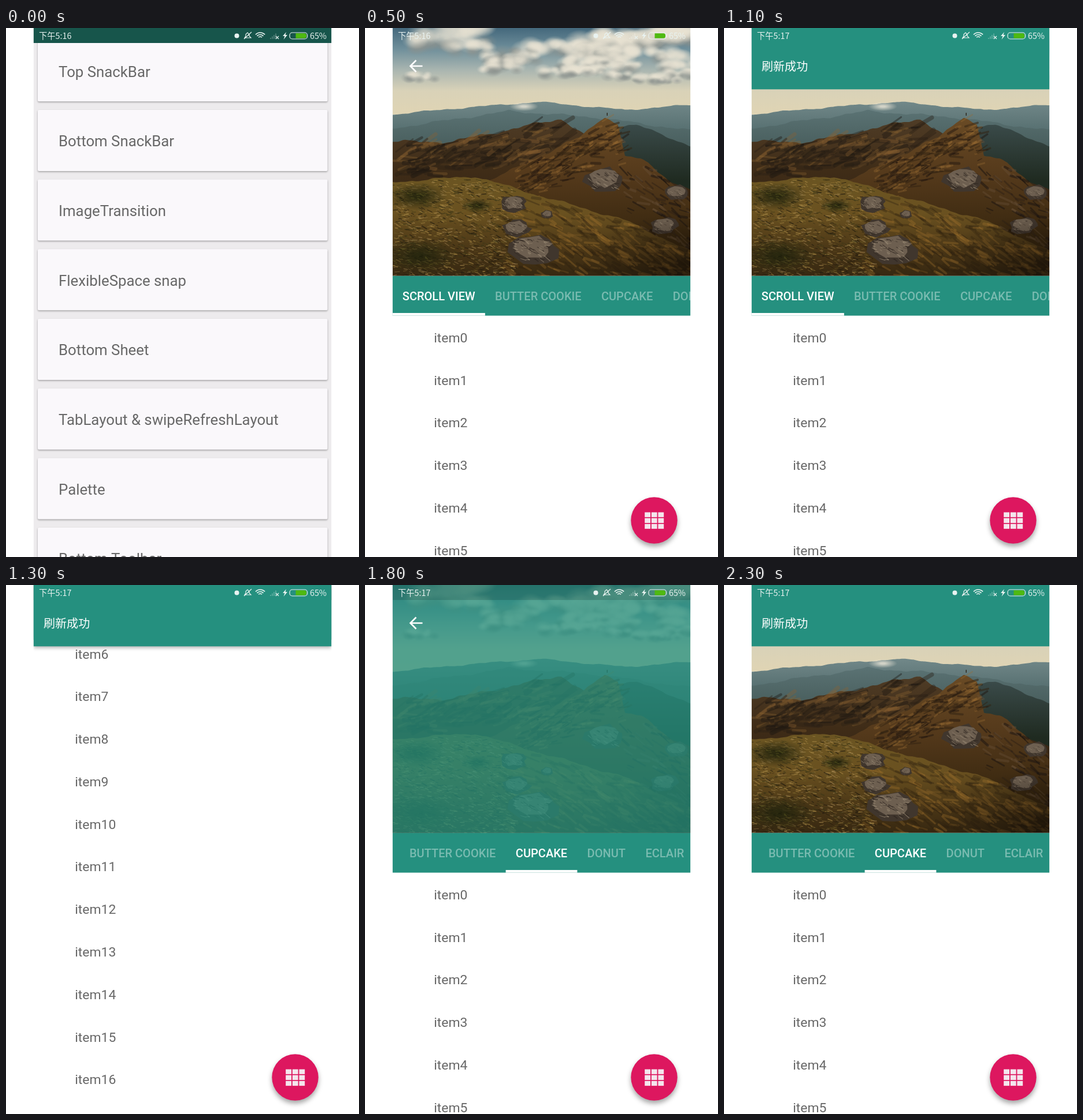
These frames come from a looping animation (611 by 917 pixels, 2400 ms). An HTML page with a canvas:

```html
<!DOCTYPE html>
<html lang="en">
<head>
<meta charset="utf-8">
<title>Refresh layout demo</title>
<style>
html, body { margin: 0; width: 100%; height: 100%; overflow: hidden; background: #fff; }
canvas { display: block; width: 611px; height: 917px; }
</style>
</head>
<body>
<canvas id="stage" width="611" height="917"></canvas>
<script>
const ctx = document.getElementById('stage').getContext('2d');
const LOOP = 2400, STEP = 100;
const H = 917, S = H / 1920, W = 1080 * S, L = (611 - W) / 2, R = L + W;
const SMALL = 42 * S, MEDIUM = 48 * S, LARGE = 54 * S;
const PHOTO_H = 900 * S, TAB_H = 144 * S, STATUS_H = 26, COLLAPSE = PHOTO_H - STATUS_H;
const ITEM_H = 73.77, LINE_H = 23.62, CARD_H = 120.7, SNACK_H = 106.3;
const TEAL = '#25907f', GREY = '#686868', ICON = '#e8f2f0';
const ROBOTO = 'Roboto, sans-serif';
const CJK = '"Noto Sans CJK SC", "Noto Sans CJK", sans-serif';

const CARDS = ['Top SnackBar', 'Bottom SnackBar', 'ImageTransition', 'FlexibleSpace snap',
  'Bottom Sheet', 'TabLayout & swipeRefreshLayout', 'Palette', 'Bottom Toolbar'];
const TABS = ['SCROLL VIEW', 'BUTTER COOKIE', 'CUPCAKE', 'DONUT', 'ECLAIR'];
const LOREM = `Lorem ipsum dolor sit amet, ut duis lorem provident
sed felis blandit, condimentum donec lectus ipsum
et mauris, morbi porttitor interdum feugiat nulla
donec sodales, vestibulum nisl primis a molestie
vestibulum quam, sapien mauris metus risus
suspendisse magnis. Augue viverra nulla faucibus
egestas eu, a etiam id congue rutrum ante, arcu
tincidunt donec quam felis at ornare, iaculis ligula
sodales venenatis commodo volutpat neque,
suspendisse elit praesent tellus felis mi amet.
Inceptos amet tempor lectus lorem est non, ac
donec ac libero neque mauris, tellus ante metus eget
leo consequat. Scelerisque dolor curabitur pretium
blandit ut feugiat, amet lacus pulvinar justo convallis
ut, sed natoque ipsum urna posuere nibh eu. Sed at
sed vulputate sit orci, facilisis a aliquam tellus quam
aliquam, eu aliquam donec at molestie ante,
pellentesque mauris lorem ultrices libero faucibus
porta, imperdiet adipiscing sit hac diam ut nulla.
Lacus enim elit pulvinar donec vehicula dapibus,
accumsan purus officia cursus dolor sapien, eu
amet dis mauris mi nulla ut. Non accusamus etiam
pede non urna tempus, vestibulum aliquam tortor
eget pharetra sodales, in vestibulum ut justo orci
nulla, lobortis purus sem semper consectetuer
magni purus. Dolor a leo vestibulum amet ut sit, arcu
ut eaque urna fusce aliquet turpis, sed fermentum
sed vestibulum nisl pede, tristique enim lorem
posuere in laborum ut. Vestibulum id id justo leo
nulla, magna lobortis ullamcorper et dignissim
pellentesque, duis suspendisse quis id lorem
Vivamus a nullam ante adipiscing amet, mi vitae
consectetuer nunc aenean pede quisque, eget
rhoncus dis porttitor habitant nunc vivamus, duis`.split('\n');

const ramp = (t, a, b) => Math.min(1, Math.max(0, (t - a) / (b - a)));
const mix = (a, b, k) => a + (b - a) * k;

function text(str, x, y, size, color, family = ROBOTO, weight = 400) {
  ctx.font = `${weight} ${size}px ${family}`;
  ctx.fillStyle = color;
  ctx.fillText(str, x, y);
}

function rect(x, y, w, h, color) {
  ctx.fillStyle = color;
  ctx.fillRect(x, y, w, h);
}

function disc(x, y, r, color) {
  ctx.fillStyle = color;
  ctx.beginPath();
  ctx.arc(x, y, r, 0, 7);
  ctx.fill();
}

function stroke(path, color, width) {
  ctx.strokeStyle = color;
  ctx.lineWidth = width;
  ctx.stroke(new Path2D(path));
}

function withShadow(alpha, blur, dy, draw) {
  ctx.save();
  ctx.shadowColor = `rgba(0,0,0,${alpha})`;
  ctx.shadowBlur = blur;
  ctx.shadowOffsetY = dy;
  draw();
  ctx.restore();
}

// Mountain view built from a few skylines, seeded clouds and grass.
function paintLandscape() {
  const cv = document.createElement('canvas');
  cv.width = 611;
  cv.height = Math.ceil(PHOTO_H);
  const g = cv.getContext('2d');
  let seed = 11;
  const rnd = () => (seed = seed * 16807 % 2147483647) / 2147483647;
  const between = (a, b) => mix(a, b, rnd());
  const floor = () => PHOTO_H;

  function gradient(y0, y1, colors) {
    const f = g.createLinearGradient(0, y0, 0, y1);
    colors.forEach((c, i) => f.addColorStop(i / (colors.length - 1), c));
    return f;
  }

  function puff(x, y, rx, ry, rgb, alpha) {
    g.save();
    g.translate(x, y);
    g.scale(rx, ry);
    const f = g.createRadialGradient(0, 0, 0.15, 0, 0, 1);
    f.addColorStop(0, `rgba(${rgb},${alpha})`);
    f.addColorStop(1, `rgba(${rgb},0)`);
    g.fillStyle = f;
    g.fillRect(-1, -1, 2, 2);
    g.restore();
  }

  function cloud(x, y, size) {
    for (let i = 0; i < 14; i++) {
      const k = rnd(), r = size * between(0.25, 0.5);
      puff(x + between(-1.3, 1.3) * size, y + (k - 0.5) * size * 0.6, r * 1.5, r,
        k > 0.65 ? '140,146,142' : '232,226,210', 0.6);
    }
  }

  // Fills below a jagged skyline and returns its height function.
  function ridge(colors, jag, ...pts) {
    const p = between(0, 6);
    const top = x => {
      let i = 1;
      while (i < pts.length - 1 && x > pts[i][0]) i++;
      const [x0, y0] = pts[i - 1], [x1, y1] = pts[i];
      const wave = Math.sin(x / 17 + p) + Math.sin(x / 7 + p * 2) / 2 + Math.sin(x / 3 + p * 3) / 4;
      return mix(y0, y1, (x - x0) / (x1 - x0)) + jag * wave;
    };
    const left = pts[0][0];
    g.fillStyle = gradient(Math.min(...pts.map(q => q[1])), pts[pts.length - 1][1] + 60, colors);
    g.beginPath();
    g.moveTo(left, PHOTO_H);
    for (let x = left; x <= 566; x += 2) g.lineTo(x, top(x));
    g.lineTo(566, PHOTO_H);
    g.fill();
    return top;
  }

  function streaks(n, x0, x1, top, bottom, colors, size, slope) {
    g.lineCap = 'round';
    for (let i = 0; i < n; i++) {
      const x = between(x0, x1), y = between(top(x) + 3, bottom(x)), len = size * between(0.4, 1.4);
      g.strokeStyle = colors[i % colors.length];
      g.lineWidth = size * between(0.1, 0.3);
      g.beginPath();
      g.moveTo(x, y);
      g.lineTo(x + len, y + len * (slope + between(-0.5, 0.5)));
      g.stroke();
    }
  }

  function rock(x, y, r) {
    const edge = scale => {
      g.beginPath();
      for (let a = 0; a < 6.28; a += 0.5) {
        const d = r * scale * between(0.75, 1.1);
        g.lineTo(x + d * Math.cos(a) * 1.25, y + d * Math.sin(a) * 0.8 + (1 - scale) * -r * 0.4);
      }
      g.fill();
    };
    g.fillStyle = '#40362d';
    edge(1);
    g.fillStyle = '#6d5f50';
    edge(0.72);
    streaks(r * 1.6, x - r, x + r * 0.7, () => y - r * 0.6, () => y + r * 0.5,
      ['#2a221c99', '#a0907a88'], r / 5, 0.5);
  }

  g.fillStyle = gradient(0, 145, ['#44687c', '#6f8f9b', '#a9b5b0', '#d9d2b8', '#dfd4b4']);
  g.fillRect(0, 0, 611, 150);
  cloud(160, 12, 45);
  for (let i = 0; i < 34; i++) {
    const d = i / 34;
    cloud(mix(L, R, Math.pow(rnd(), mix(0.35, 0.8, d))), 8 + 84 * d, mix(38, 18, d));
  }

  ridge(['#718889', '#4f6869'], 1, [L, 150], [150, 140], [300, 128], [450, 142], [566, 133]);
  ridge(['#5a7273', '#405452'], 1.5, [L, 174], [250, 144], [400, 155], [566, 178]);
  puff(275, 136, 25, 8, '236,231,216', 0.8);
  ridge(['#3a4a49', '#1f2a20'], 1.5, [400, 172], [470, 168], [566, 205]);

  const far = ridge(['#4f3c26', '#3f2c17', '#2f2114'], 2, [L, 197], [150, 197], [340, 157], [450, 235], [566, 280]);
  streaks(160, L, 330, far, x => mix(260, 235, ramp(x, L, 330)), ['#1b161166', '#8a623055', '#2a201566'], 26, -0.35);

  const peak = ridge(['#6a4b25', '#54391b', '#38270f'], 2,
    [214, 266], [370, 190], [415, 152], [438, 170], [450, 222], [490, 232], [566, 300]);
  streaks(190, 255, 440, peak, x => peak(x) + 65, ['#20160e77', '#9a6d3255', '#33231388'], 16, -0.4);
  streaks(170, 440, 566, peak, floor, ['#1c151088', '#6b553b55', '#2c201577'], 15, 0.6);
  rock(413, 263, 28);
  rock(518, 343, 20);
  rock(539, 285, 17);

  const near = ridge(['#6b5522', '#6a5120', '#4a3616', '#2f220f'], 1.5,
    [L, 267], [190, 257], [300, 290], [450, 333], [566, 388]);
  streaks(420, 230, 566, near, floor, ['#2a1e1055', '#a9782e4d', '#7d5a2566', '#32250f55'], 18, 0.5);
  streaks(1500, L, 260, near, floor, ['#1d170d99', '#a58643aa', '#6b5a2688', '#3a361899', '#c0a06a66'], 6, 0.2);
  for (const [x, y, r] of [[90, 292, 48], [195, 308, 26], [95, 395, 62]]) {
    puff(x, y, r * 1.1, r * 0.5, '38,38,14', 0.9);
    streaks(r, x - r * 0.8, x + r * 0.6, () => y - r * 0.3, () => y + r * 0.3, ['#5d5a2288', '#1d1d0c99'], 5, 0.2);
  }
  rock(256, 305, 20);
  rock(315, 323, 9);
  rock(262, 348, 20);
  rock(292, 384, 36);
  puff(R, PHOTO_H, 200, 110, '18,12,6', 0.6);
  g.fillStyle = '#30291f';
  g.fillRect(418.5, 147, 1.5, 5);
  return cv;
}
const photo = paintLandscape();

function statusBar(clock, alpha) {
  ctx.save();
  ctx.globalAlpha *= alpha;
  text('下午' + clock, 57, 19, 14.3, ICON, CJK);
  text('65%', 526, 18.5, 14.3, ICON, CJK);
  disc(399.5, 13.5, 4, ICON);
  stroke('M413 17l2-3v-3l3-3 3 3v3l3 3zM412 19L425 7', ICON, 1.2);
  for (let r = 4; r < 12; r += 3.5) {
    ctx.beginPath();
    ctx.arc(440, 19, r, -Math.PI * 0.76, -Math.PI * 0.24);
    ctx.lineWidth = 1.7;
    ctx.stroke();
  }
  for (let i = 0; i < 4; i++) rect(457 + i * 3, 17 - i * 2.5, 2, 2 + i * 2.5, 'rgba(255,255,255,.22)');
  stroke('M467 14l5 5m0-5l-5 5', ICON, 1.1);
  ctx.fillStyle = ICON;
  ctx.fill(new Path2D('M485 7l-6 7h3.5l-2 6 6.5-8h-3.5z'));
  ctx.beginPath();
  ctx.roundRect(491, 8, 30.5, 11, 4.5);
  ctx.lineWidth = 1.2;
  ctx.stroke();
  ctx.fillStyle = '#4fb911';
  ctx.beginPath();
  ctx.roundRect(501.5, 9.3, 18.5, 8.4, [0, 3.5, 3.5, 0]);
  ctx.fill();
  ctx.restore();
}

function cardList(pressed) {
  rect(L, 0, W, H, '#edebed');
  CARDS.forEach((name, i) => {
    const y = 21.2 + i * CARD_H;
    withShadow(0.32, 3, 1.5, () => {
      ctx.fillStyle = i === pressed ? '#e4e2e6' : '#faf8fb';
      ctx.beginPath();
      ctx.roundRect(55, y, 501.5, 106, 2);
      ctx.fill();
    });
    text(name, 91, y + 63.3, LARGE, GREY);
  });
  rect(L, 0, W, STATUS_H, '#17554b');
  statusBar('5:16', 1);
}

function items(x, y) {
  for (let i = 0; i < 24; i++) text('item' + i, x + 150 * S, y + i * ITEM_H, MEDIUM, GREY);
}

function tabBar(y, page) {
  ctx.font = `500 ${SMALL}px ${ROBOTO}`;
  const pad = 36 * S;
  let x = 0;
  const tabs = TABS.map(name => {
    const tab = { name, x, w: ctx.measureText(name).width + 2 * pad };
    x += tab.w;
    return tab;
  });
  const a = tabs[Math.floor(page)], b = tabs[Math.ceil(page)], k = page % 1;
  const mark = mix(a.x, b.x, k), width = mix(a.w, b.w, k);
  const left = L - Math.max(0, mark + width / 2 - W / 2);

  rect(L, y, W, TAB_H, TEAL);
  tabs.forEach((tab, i) => {
    const on = Math.max(0, 1 - Math.abs(page - i));
    text(tab.name, left + tab.x + pad, y + 42.3, SMALL, `rgba(255,255,255,${mix(0.39, 1, on)})`, ROBOTO, 500);
  });
  rect(left + mark, y + TAB_H - 4.6, width, 4.6, '#fff');
}

function header(collapse, scrim, page) {
  const bottom = PHOTO_H - collapse;
  ctx.save();
  ctx.beginPath();
  ctx.rect(L, 0, W, bottom);
  ctx.clip();
  ctx.drawImage(photo, 0, -collapse / 2);
  ctx.globalAlpha *= scrim;
  rect(L, 0, W, bottom, TEAL);
  rect(L, 0, W, STATUS_H, 'rgba(0,0,0,.2)');
  ctx.restore();
  if (collapse < COLLAPSE * 0.8) stroke('M99.5 66H79M88.5 56l-10 10 10 10', '#fff', 2.6);
  tabBar(bottom, page);
}

function fab(x, y) {
  withShadow(0.36, 9, 5, () => disc(x, y, 40.2, '#dd175f'));
  for (let i = 0; i < 9; i++)
    rect(x - 16.3 + (i % 3) * 11.6, y - 14 + Math.floor(i / 3) * 10.1, 9.8, 8.4, '#f4e6ed');
}

// Drops in between the two times, then spins.
function spinner(t, from, to) {
  const y = mix(-35, 63.5, ramp(t, from, to)), turn = (t - to) / 150;
  withShadow(0.25, 4, 1.5, () => disc(305.5, y, 28.8, '#fafafa'));
  ctx.strokeStyle = TEAL;
  ctx.lineWidth = 3.6;
  ctx.beginPath();
  ctx.arc(305.5, y, 13, turn - 1.15, turn + 1.05);
  ctx.stroke();
}

function snack(y, lifted) {
  withShadow(lifted ? 0.3 : 0, 6, 3, () => rect(L, y, W, SNACK_H, TEAL));
  text('刷新成功', 65, y + 74.3, SMALL, '#fff', CJK);
}

function detail(t) {
  const rise = 27 * Math.pow(1 - ramp(t, 200, 500), 3);
  const scrolled = t >= 1300, reloaded = t >= 1100;
  const collapse = scrolled ? COLLAPSE * (1 - ramp(t, 1600, 1800)) : 0;
  const scrim = scrolled ? 1 - ramp(t, 1700, 2100) : 0;
  const page = ramp(t, 1300, 1500) + ramp(t, 1500, 1700);
  const pageX = n => L + (n - page) * W;
  const top = PHOTO_H + TAB_H - collapse + rise;

  rect(L, 0, W, H, '#fff');
  if (page < 1) items(pageX(0), top + 46.2 - (scrolled ? 456 : 0));
  if (page > 0 && page < 2)
    LOREM.forEach((s, i) => text(s, pageX(1) + 23.4, top + 44.5 + i * LINE_H, SMALL, GREY));
  if (page > 1) items(pageX(2), top + 46.2);

  header(collapse, scrim, page);
  fab(500.5 + rise * 0.4, 853.5 + rise * 0.9);

  if (!reloaded) spinner(t, 500, 900);
  else if (t < 1500) snack(-SNACK_H * ramp(t, 1300, 1500), scrolled);
  else if (t < 2300) spinner(t, 1900, 2100);
  else snack(0, false);
  statusBar(reloaded ? '5:17' : '5:16', mix(0.5, 1, ramp(t, 200, 500)));
}

function frame() {
  const t = Math.floor(performance.now() % LOOP / STEP) * STEP;
  rect(0, 0, 611, H, '#fff');
  ctx.save();
  ctx.beginPath();
  ctx.rect(L, 0, W, H);
  ctx.clip();
  if (t < 300) cardList(t === 100 ? 5 : -1);
  if (t >= 200) {
    ctx.globalAlpha = t < 300 ? 0.65 : 1;
    detail(t);
  }
  ctx.restore();
  requestAnimationFrame(frame);
}
frame();
</script>
</body>
</html>
```
